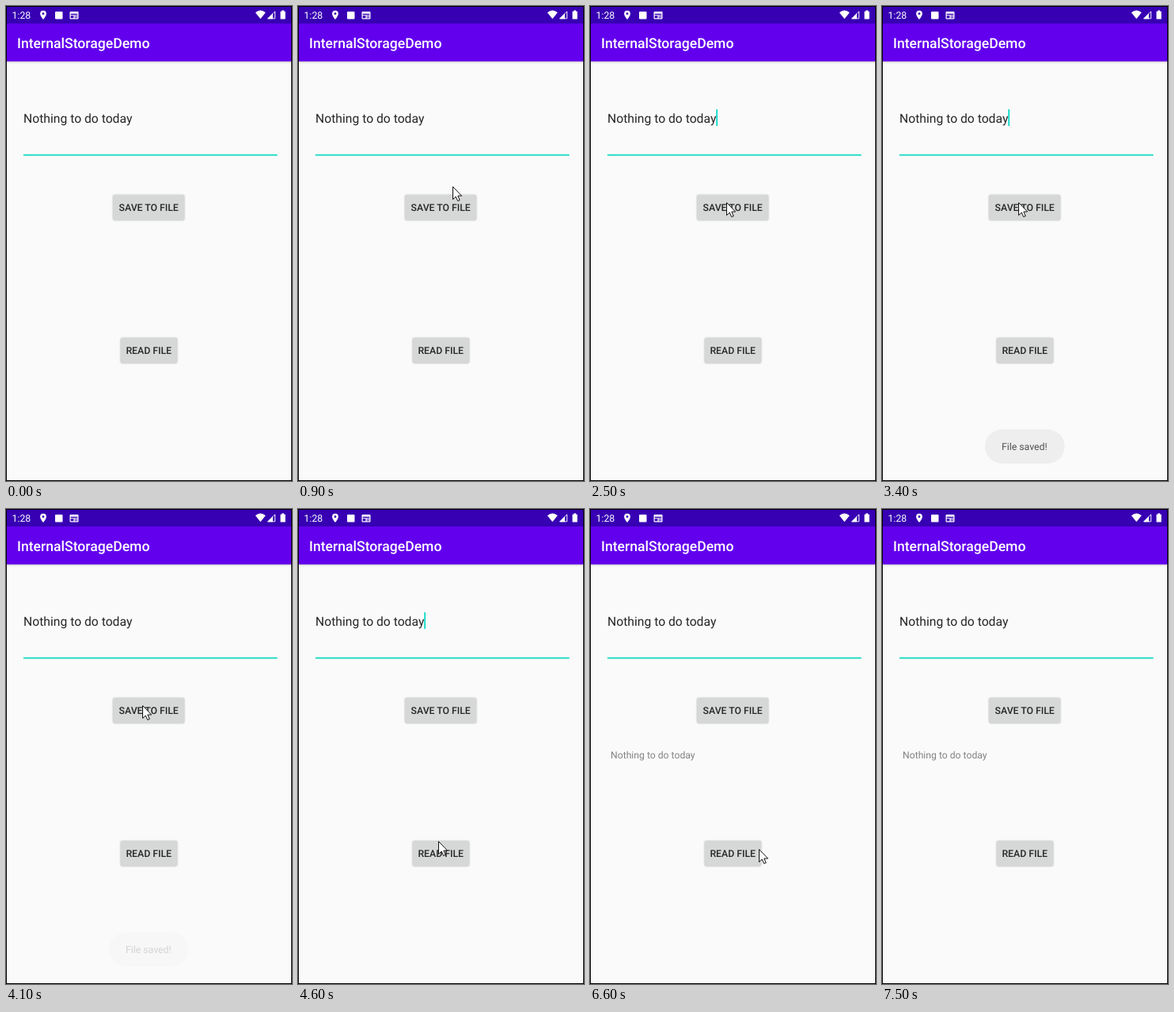
These frames come from a looping animation (361x598 px, 7.9 s). An HTML page:

```html
<!DOCTYPE html>
<html lang="en">
<head>
<meta charset="utf-8">
<title>Internal storage demo</title>
<style>
  html, body { margin: 0; width: 100%; height: 100%; overflow: hidden; background: #000; }
  svg { display: block; width: 361px; height: 598px; font-family: Roboto, sans-serif; text-rendering: geometricPrecision; }
  .bar { filter: drop-shadow(0 1px 1px rgba(0, 0, 0, .22)); }
  .title { font-size: 17.6px; font-weight: 500; }
  .button rect { fill: #d6d7d7; filter: drop-shadow(0 .7px .8px rgba(0, 0, 0, .3)); }
  .button .pressed { fill: #b8baba; filter: drop-shadow(0 1.4px 1.4px rgba(0, 0, 0, .26)); visibility: hidden; }
  .button text { font-size: 12.25px; font-weight: 500; fill: #262626; text-anchor: middle; }
</style>
</head>
<body>
<svg viewBox="0 0 361 598">
  <defs>
    <clipPath id="screen"><rect x="1" y="1" width="359" height="596"/></clipPath>
    <clipPath id="ripple"><circle cx="176" cy="432" r="41"/></clipPath>
  </defs>
  <rect width="361" height="598" fill="#000"/>
  <g clip-path="url(#screen)">
    <rect x="1" y="1" width="359" height="596" fill="#fafafa"/>
    <rect class="bar" x="1" y="22" width="359" height="47.700" fill="#6200ee"/>
    <rect x="1" y="1" width="359" height="21" fill="#3700b3"/>

    <g fill="#fff">
      <text x="7.500" y="16" font-size="12.300">1:28</text>
      <path fill-rule="evenodd" d="M47 5.800a3.900 3.900 0 0 0-3.900 3.900C43.100 12.600 47 16.900 47 16.900s3.900-4.300 3.900-7.200A3.900 3.900 0 0 0 47 5.800Zm0 2.500a1.400 1.400 0 1 1 0 2.800a1.400 1.400 0 0 1 0-2.800Z"/>
      <rect x="62" y="7" width="9.500" height="9.500" rx="1"/>
      <path fill-rule="evenodd" d="M81.500 7h9a1 1 0 0 1 1 1v7.500a1 1 0 0 1-1 1h-9a1 1 0 0 1-1-1V8a1 1 0 0 1 1-1Zm.2 2.700v1.500h8.600V9.700Zm0 2.600v3h3.700v-3Zm4.900 0v1h3.700v-1Zm0 2v1h3.700v-1Z"/>
      <path d="M314.800 8.300Q321.200 2.500 327.600 8.300L321.200 16.200Z"/>
      <path d="M336.800 9.200V16.200H329.800Z"/>
      <path d="M339.500 6.900V15.800H330.600Z" fill="none" stroke="#fff" stroke-width=".9"/>
      <path d="M348 5.500h3v1.200h1.600v9.800h-6.200V6.700H348Z"/>
      <text class="title" x="14" y="53">InternalStorageDemo</text>
    </g>

    <text x="22.100" y="147" font-size="15.700" fill="#262626">Nothing to do today</text>
    <rect id="caret" x="159.300" y="130" width="1.700" height="21" fill="#03dac5"/>
    <rect x="22" y="186.700" width="320.500" height="1.800" fill="#12d9c2"/>

    <g class="button">
      <rect x="135.200" y="238" width="89.800" height="31.500" rx="1.800"/>
      <rect id="savePressed" class="pressed" x="135.200" y="238" width="89.800" height="31.500" rx="1.800"/>
      <text x="180.200" y="258.300">SAVE TO FILE</text>
    </g>
    <g class="button">
      <rect x="144.800" y="418" width="71.200" height="31.500" rx="1.800"/>
      <g id="readClip"><rect id="readPressed" class="pressed" x="144.800" y="418" width="71.200" height="31.500" rx="1.800"/></g>
      <text x="180.200" y="438.300">READ FILE</text>
    </g>

    <text id="result" x="26" y="313.500" font-size="12.200" fill="#828282">Nothing to do today</text>

    <g id="toast">
      <rect x="130" y="533" width="100.500" height="43" rx="21.500" fill="#eee"/>
      <text x="151" y="559.300" font-size="12.250" fill="#505050">File saved!</text>
    </g>

    <path id="pointer" d="M.5 .5V16.500L4.200 13L6.700 18.500L9.200 17.400L6.800 12H11.600Z" fill="#fff" stroke="#111"/>
  </g>
</svg>
<script>
  const LOOP = 7900, TICK = 100;
  const parts = Object.fromEntries([...document.querySelectorAll('[id]')].map(el => [el.id, el]));

  const clamp = v => Math.min(1, Math.max(0, v));
  const progress = (t, start, end) => clamp((t - start) / (end - start));
  const mix = (a, b, u) => a + (b - a) * u;
  const within = (t, start, end) => t >= start && t < end;
  const show = (el, on) => { el.style.visibility = on ? 'visible' : 'hidden'; };

  const easeOut = u => 1 - (1 - u) ** 2;
  const easeInOut = u => u * u * (3 - 2 * u);
  const easeIn = u => u ** 1.3;

  // The caret stays lit around the first click, then restarts its blink
  function caretOn(t) {
    if (t < 1300) return within(t, 300, 800);
    return t < 2870 || (t - 2870) % 915 >= 440;
  }

  function pointerTip(t) {
    const enter = progress(t, 500, 1100);
    const leave = easeIn(progress(t, 6500, 6800));
    const descend = easeInOut(progress(t, 4300, 4600));
    const settle = progress(t, 4600, 4800);
    const x = mix(343, 172, Math.sin(enter * Math.PI / 2)) + 5 * descend - settle + 153 * leave;
    const y = mix(70, 247, easeOut(enter)) + 171 * descend + 10 * settle + leave;
    return [x, y];
  }

  function draw(t) {
    show(parts.caret, caretOn(t));
    show(parts.savePressed, within(t, 1800, 2500));
    show(parts.readPressed, within(t, 5400, 5700));
    parts.readClip.setAttribute('clip-path', t < 5500 ? 'url(#ripple)' : 'none');
    show(parts.result, t >= 5600);
    parts.toast.style.opacity = progress(t, 2800, 3300) * (1 - progress(t, 3750, 4200));
    show(parts.pointer, within(t, 500, 6900));
    parts.pointer.setAttribute('transform', `translate(${pointerTip(t).map(Math.round)})`);
  }

  function frame() {
    const t = performance.now() % LOOP;
    draw(Math.floor(t / TICK) * TICK);
    requestAnimationFrame(frame);
  }
  frame();
</script>
</body>
</html>
```
